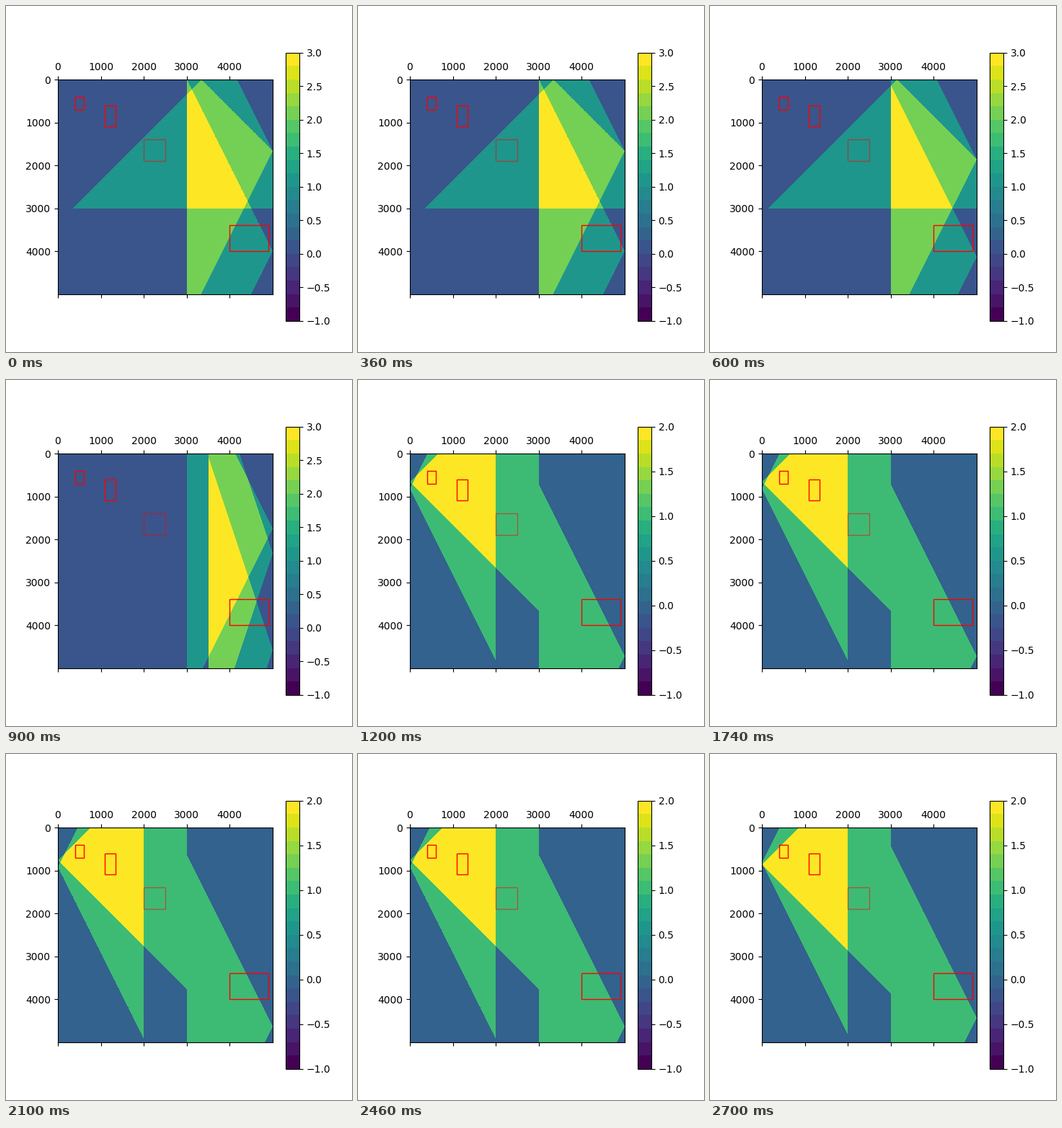
Animation, 480 px wide and 480 px high, one loop 3000 ms. Source, as a matplotlib script:

```python
import numpy as np
import matplotlib.pyplot as plt
from matplotlib.animation import FuncAnimation
from matplotlib.patches import Rectangle

SIZE = 5000
CELL = 2
STEP_MS = 300

pos = np.arange(CELL / 2, SIZE, CELL, dtype=np.float32)
X, Y = pos[None, :], pos[:, None]


def from_right(start, apex, slope):
    """Wedge with its tip on the right wall, cut off at x = start."""
    return (X > start) & (X < SIZE - np.abs(Y - apex) / slope)


def from_left(end, apex, slope):
    """Wedge with its tip on the left wall, cut off at x = end."""
    return (X < end) & (X > np.abs(Y - apex) / slope)


def from_top(end, apex, slope):
    """Wedge with its tip on the top wall, cut off at y = end."""
    return (Y < end) & (Y > np.abs(X - apex) * slope)


# (steps held, colour maximum, wedges)
STAGES = [
    (2, 3, [(from_top, 3000, 3340, 1),
            (from_right, 3000, 1660, 2),
            (from_right, 3000, 4000, 2)]),
    (1, 3, [(from_top, 3000, 3140, 1),
            (from_right, 3000, 1860, 2),
            (from_right, 3000, 4128, 2)]),
    (1, 3, [(from_right, 3000, 1745, 2),
            (from_right, 3500, 2320, 3),
            (from_right, 3500, 4570, 3)]),
    (3, 2, [(from_left, 3000, 660, 1),
            (from_left, 2000, 820, 2),
            (from_right, 3000, 4720, 2)]),
    (2, 2, [(from_left, 3000, 760, 1),
            (from_left, 2000, 916, 2),
            (from_right, 3000, 4630, 2)]),
    (1, 2, [(from_left, 3000, 863, 1),
            (from_left, 2000, 820, 2),
            (from_right, 3000, 4435, 2)]),
]
ORDER = [i for i, stage in enumerate(STAGES) for _ in range(stage[0])]

# x, y, width, height, alpha
BOXES = [
    (400, 400, 200, 300, 1),
    (1100, 600, 250, 500, 1),
    (2000, 1400, 500, 500, 0.5),
    (4000, 3400, 900, 600, 1),
]


def coverage(wedges):
    # the small offset keeps whole numbers clear of the colour bin edges
    total = np.full((pos.size, pos.size), 0.01, dtype=np.float32)
    for shape, limit, apex, slope in wedges:
        total += shape(limit, apex, slope)
    return total


fig = plt.figure(figsize=(4.8, 4.8), dpi=100)
ax = fig.add_axes([0.15, 0.09, 0.775, 0.775])
image = ax.imshow(coverage(STAGES[0][2]), cmap=plt.get_cmap("viridis", 20),
                  vmin=-1, vmax=3, interpolation="nearest",
                  extent=(0, SIZE, SIZE, 0))
ax.set_xticks(range(0, SIZE, 1000))
ax.set_yticks(range(0, SIZE, 1000))
ax.xaxis.tick_top()
ax.xaxis.set_ticks_position("both")
bar = fig.colorbar(image, ax=ax)

for x, y, w, h, alpha in BOXES:
    ax.add_patch(Rectangle((x, y), w, h, fill=False, edgecolor="red",
                           linewidth=1, alpha=alpha))


def update(step):
    _, top, wedges = STAGES[ORDER[step]]
    image.set_data(coverage(wedges))
    image.set_clim(-1, top)
    bar.set_ticks(np.arange(-1, top + 0.1, 0.5))
    return [image]


anim = FuncAnimation(fig, update, frames=len(ORDER), interval=STEP_MS,
                     repeat=True, repeat_delay=0, blit=False)
plt.show()
```
